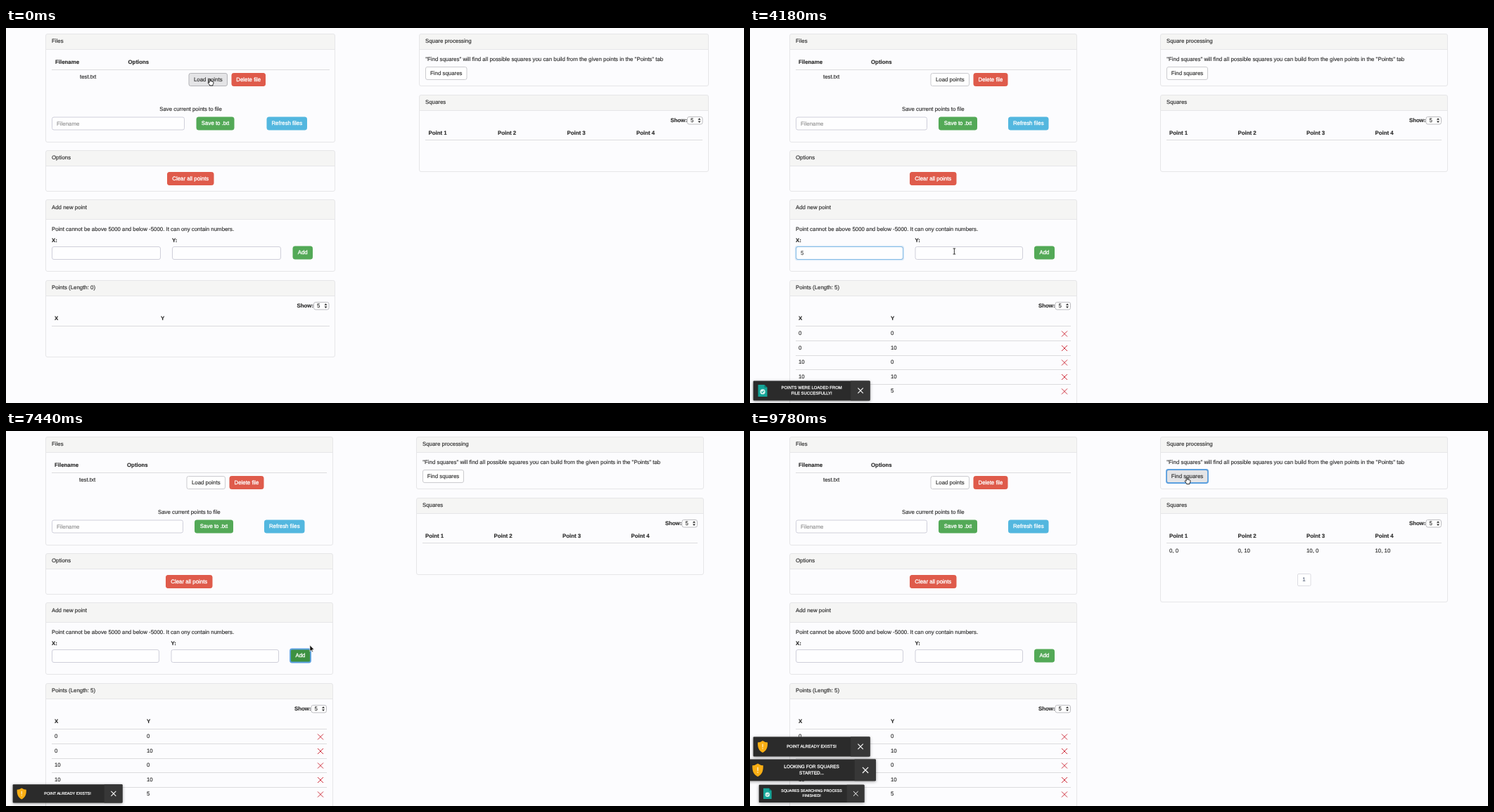
An HTML page with a canvas that plays this animation: 1049x534 px, repeating every 9880 ms.

```html
<!DOCTYPE html>
<html lang="en">
<head>
<meta charset="utf-8">
<title>Square finder</title>
<style>
html, body { margin: 0; width: 100%; height: 100%; overflow: hidden; background: #fcfcfe; }
canvas { display: block; width: 1049px; height: 534px; }
</style>
</head>
<body>
<canvas id="stage"></canvas>
<script>
const W = 1049, H = 534, LOOP = 9880, LAST = 9780;
const canvas = document.getElementById('stage');
const ctx = canvas.getContext('2d');
const dpr = window.devicePixelRatio || 1;
canvas.width = W * dpr;
canvas.height = H * dpr;

const FONT = '"Liberation Sans", Arial, sans-serif';
const INK = '#2a2a2a', LINE = '#dcdcde', EDGE = '#e6e6e8', PAGE = '#fcfcfe';
const RED = '#df5b4b', GREEN = '#53a957', BLUE = '#53b7df', RING = '#5a9fe0';

// moments of the user's actions and the page's replies
const T = {
  loadClick: 720, loaded: 930, xFocus: 3000, xTyped: 3560,
  yFocus: 4640, yTyped: 5200, firstOut: 6235, addClick: 6780,
  exists: 7080, findClick: 9420, started: 9580, finished: 9616
};

const pointer = [
  { from: 0, to: 0, x: 291, y: 77 },
  { from: 1750, to: 2650, x: 195.5, y: 316.5 },
  { from: 3800, to: 4560, x: 384.5, y: 319.5 },
  { from: 5750, to: 6400, x: 422, y: 325 },
  { from: 7300, to: 8250, x: 622, y: 70.5 }
];

const points = [[0, 0], [0, 10], [10, 0], [10, 10], [5, 5]];
const IN_KEYS = [[0, 0], [.2, 1.1], [.4, .9], [.6, 1.03], [.8, .97], [1, 1]];
const OUT_KEYS = [[0, 1], [.25, .95], [.5, 1.1], [1, 0]];

let wide = true;
const pick = (a, b) => wide ? a : b;

function keyed(keys, p) {
  if (p <= 0) return keys[0][1];
  for (let i = 1; i < keys.length; i++) {
    const [p0, v0] = keys[i - 1], [p1, v1] = keys[i];
    if (p <= p1) return v0 + (v1 - v0) * (p - p0) / (p1 - p0);
  }
  return keys[keys.length - 1][1];
}

function text(str, x, y, o = {}) {
  const size = o.size || 7.86;
  const base = y + size * .31;
  ctx.font = (o.bold ? 'bold ' : '') + size + 'px ' + FONT;
  ctx.textRendering = 'geometricPrecision';
  ctx.textAlign = o.align || 'left';
  ctx.fillStyle = ctx.strokeStyle = o.color || INK;
  ctx.fillText(str, x, base);
  ctx.lineWidth = o.heavy || .14;
  ctx.strokeText(str, x, base);
}

function box(x0, y0, x1, y1, fill, stroke, r = 2.5, weight = 1) {
  ctx.beginPath();
  ctx.roundRect(x0, y0, x1 - x0, y1 - y0, r);
  if (fill) { ctx.fillStyle = fill; ctx.fill(); }
  if (stroke) { ctx.strokeStyle = stroke; ctx.lineWidth = weight; ctx.stroke(); }
}

function rule(x0, x1, y, color = LINE) {
  ctx.fillStyle = color;
  ctx.fillRect(x0, y, x1 - x0, 1);
}

function cross(x, y, r, color, weight) {
  ctx.beginPath();
  ctx.moveTo(x - r, y - r); ctx.lineTo(x + r, y + r);
  ctx.moveTo(x + r, y - r); ctx.lineTo(x - r, y + r);
  ctx.strokeStyle = color;
  ctx.lineWidth = weight;
  ctx.stroke();
}

function panel(x0, x1, y0, head, y1, title) {
  box(x0 + .5, y0 + .5, x1 - .5, y1 - .5, PAGE, null);
  box(x0 + .5, y0 + .5, x1 - .5, head, '#f5f5f4', null, [2.5, 2.5, 0, 0]);
  rule(x0, x1, head, EDGE);
  box(x0 + .5, y0 + .5, x1 - .5, y1 - .5, null, EDGE);
  text(title, x0 + 9, (y0 + head) / 2 + (head - y0 > 25 ? -2.3 : 0));
}

function button(label, x0, x1, y, fill, focus) {
  const plain = fill === '#fff' || fill === '#e4e4e6';
  const edge = fill === '#fff' ? '#cbcbcf' : plain ? '#b4b4b8' : fill;
  box(x0 + .5, y + .5, x1 - .5, y + 18.5, fill, edge);
  if (focus) box(x0, y, x1, y + 19, null, RING, 2.5, 1.8);
  text(label, (x0 + x1) / 2, y + 9.5,
    { align: 'center', color: plain ? INK : '#fff', heavy: plain ? 0 : .3 });
}

// focus runs from 0 to 1
function input(x0, x1, y, value, focus, hint) {
  box(x0 + .5, y + .5, x1 - .5, y + 18.5, '#fefeff', '#cfcfda');
  if (focus > 0) {
    ctx.globalAlpha = focus;
    box(x0 - .5, y - .5, x1 + .5, y + 19.5, null, 'rgba(102,175,233,.22)', 3, 1.6);
    box(x0 + .5, y + .5, x1 - .5, y + 18.5, null, '#84bbe6');
    ctx.globalAlpha = 1;
  }
  text(value || hint || '', x0 + 7, y + 9.7, { color: value ? '#444' : '#909090' });
}

function select(x0, x1, y) {
  text('Show:', x0, y + 5.5, { bold: true, align: 'right' });
  box(x0 + .5, y + .5, x1 - .5, y + 11, '#fff', '#bdbdc1');
  text('5', x0 + 5, y + 5.7);
  const x = x1 - 5;
  ctx.fillStyle = INK;
  ctx.beginPath();
  ctx.moveTo(x - 2, y + 4.8); ctx.lineTo(x, y + 2.3); ctx.lineTo(x + 2, y + 4.8);
  ctx.moveTo(x - 2, y + 6.6); ctx.lineTo(x, y + 9.1); ctx.lineTo(x + 2, y + 6.6);
  ctx.fill();
}

function caret(x, y, since, t) {
  if ((t - since) % 1060 < 530) {
    ctx.fillStyle = INK;
    ctx.fillRect(x, y - 4, .8, 8);
  }
}

function leftColumn(t) {
  const right = pick(468, 465), end = pick(460, 456);
  const loaded = t >= T.loaded;
  const loadFocus = t >= T.loadClick && t < T.xFocus;
  const loadHot = t < T.xFocus;

  panel(56, right, 8, 30, 163, 'Files');
  text('Filename', pick(70, 69), 48.7, { bold: true });
  text('Options', pick(173.5, 172), 48.7, { bold: true });
  rule(65, end, 59);
  text('test.txt', pick(105, 104), 69.8);
  button('Load points', pick(259.5, 256.5), pick(315, 312), 64, loadHot ? '#e4e4e6' : '#fff', loadFocus);
  button('Delete file', pick(320.5, 317.5), pick(369, 366.5), 64, RED);
  text('Save current points to file', pick(262.5, 260.3), 115.7, { align: 'center' });
  input(65, pick(254, 252), 126.5, '', 0, 'Filename');
  button('Save to .txt', pick(270.5, 268), pick(324.5, 323), 126.5, GREEN);
  button('Refresh files', pick(370.5, 367), pick(428, 424.5), 126.5, BLUE);

  panel(56, right, 174, 196, 233, 'Options');
  button('Clear all points', pick(229, 227), pick(295.5, 293.5), 205, RED);

  // a field's glow fades in and out
  const glow = (from, to) => Math.max(0, Math.min(1, (t - from) / 150, 1 - (t - to) / 150));
  const xFocus = t >= T.xFocus && t < T.yFocus;
  const yFocus = t >= T.yFocus && t < T.addClick;
  const xVal = t >= T.xTyped && t < T.exists ? '5' : '';
  const yVal = t >= T.yTyped && t < T.exists ? '5' : '';
  const yLeft = pick(236, 234.5);
  panel(56, right, 244, 272, 347, 'Add new point');
  text('Point cannot be above 5000 and below -5000. It can ony contain numbers.', 65, 286.7);
  text('X:', 65, 303, { bold: true });
  text('Y:', yLeft, 303, { bold: true });
  input(65, pick(220, 218), 311, xVal, glow(T.xFocus, T.yFocus));
  input(yLeft, pick(391, 388), 311, yVal, glow(T.yFocus, T.addClick));
  if (xFocus) caret(72 + (xVal ? 4.6 : 0), 320.7, xVal ? T.xTyped : T.xFocus, t);
  if (yFocus) caret(yLeft + 7 + (yVal ? 4.6 : 0), 320.7, yVal ? T.yTyped : T.yFocus, t);

  const addFocus = t >= T.addClick && t < T.findClick;
  let addFill = GREEN;
  if (addFocus) addFill = t < T.addClick + 150 ? '#2f7432' : '#3d9141';
  else if (t > 6350 && t < T.addClick) addFill = '#449a48';
  button('Add', pick(407.5, 404), pick(436, 433), 310.5, addFill, addFocus);

  panel(56, right, 359, 381, loaded ? 620 : 469, 'Points (Length: ' + (loaded ? 5 : 0) + ')');
  select(pick(437, 433.5), pick(459.5, 456), 390);
  text('X', 69, 413.7, { bold: true });
  text('Y', pick(220, 200), 413.7, { bold: true });
  rule(65, end, 424);
  if (!loaded) return;
  points.forEach(([px, py], i) => {
    const y = 434.9 + i * 20.5;
    if (i) rule(65, end, Math.round(y - 10.4));
    text(px, 69, y);
    text(py, 200, y);
    cross(447, y + .6, 4, '#cf3340', 1);
  });
}

function rightColumn(t) {
  const x0 = pick(587, 583), x1 = pick(999, 992), end = pick(990, 983);
  const found = t >= T.finished;
  const cols = wide ? [600.5, 699, 797.5, 896] : [596, 693.5, 791, 888.5];
  panel(x0, x1, 8, 30, 83, 'Square processing');
  text('"Find squares" will find all possible squares you can build from the given points in the "Points" tab',
    x0 + 9.2, 44.7);
  button('Find squares', x0 + 9, pick(655.5, 651), 55, t > 8190 ? '#e4e4e6' : '#fff', t >= T.findClick);

  panel(x0, x1, 95, 117, found ? 244 : 205, 'Squares');
  select(pick(968, 960.5), pick(990.5, 983), 126);
  cols.forEach((x, i) => text('Point ' + (i + 1), x, 149.6, { bold: true }));
  rule(x0 + 9, end, 159);
  if (!found) return;
  cols.forEach((x, i) => text(points[i].join(', '), x, 170.6));
  box(778.5, 203.5, 797, 220.5, '#fff', '#dcdce2', 1.5);
  text('1', 787.5, 212, { align: 'center', color: '#56617a' });
}

function fileIcon() {
  ctx.fillStyle = '#16a598';
  ctx.beginPath();
  ctx.moveTo(-6.5, -8.5); ctx.lineTo(2.5, -8.5); ctx.lineTo(6.5, -4.5);
  ctx.lineTo(6.5, 8.5); ctx.lineTo(-6.5, 8.5);
  ctx.fill();
  ctx.fillStyle = '#0c7a72';
  ctx.beginPath();
  ctx.moveTo(2.5, -8.5); ctx.lineTo(6.5, -4.5); ctx.lineTo(2.5, -4.5);
  ctx.fill();
  ctx.fillStyle = '#d8f3ef';
  ctx.beginPath();
  ctx.arc(0, 1.5, 3.6, 0, 7);
  ctx.fill();
  ctx.strokeStyle = '#16a598';
  ctx.lineWidth = 1.1;
  ctx.beginPath();
  ctx.moveTo(-1.7, 1.5); ctx.lineTo(-.4, 2.8); ctx.lineTo(1.9, .3);
  ctx.stroke();
}

function shieldIcon() {
  ctx.fillStyle = '#f9ae14';
  ctx.beginPath();
  ctx.moveTo(0, -8.5);
  ctx.quadraticCurveTo(3.5, -6, 7, -6);
  ctx.bezierCurveTo(7.3, 2, 5, 6, 0, 8.5);
  ctx.bezierCurveTo(-5, 6, -7.3, 2, -7, -6);
  ctx.quadraticCurveTo(-3.5, -6, 0, -8.5);
  ctx.fill();
  ctx.fillStyle = '#fff3d0';
  ctx.fillRect(-.6, -3.8, 1.2, 4.8);
  ctx.fillRect(-.6, 2.2, 1.2, 1.3);
}

function toast(lines, icon, cy, scale) {
  if (scale <= 0) return;
  ctx.save();
  ctx.translate(87.6, cy);
  ctx.scale(scale, scale);
  ctx.shadowColor = 'rgba(0,0,0,.4)';
  ctx.shadowBlur = 4 * dpr;
  ctx.shadowOffsetY = dpr;
  box(-83, -14, 83, 14, '#2b2b2b', null, 1);
  ctx.shadowColor = 'transparent';
  box(55.5, -14, 83, 14, '#373737', null, [0, 1, 1, 0]);
  cross(69.5, 0, 3.7, '#fff', 1.1);
  lines.forEach((s, i) => text(s, 0, (i - (lines.length - 1) / 2) * 8.2 - .3,
    { size: 5.9, align: 'center', color: '#fff', heavy: .25 }));
  ctx.translate(-69.6, 0);
  icon();
  ctx.restore();
}

function toasts(t) {
  const grow = from => keyed(IN_KEYS, (t - from) / 1000);
  const base = 516.4, gap = 33.5;
  if (t >= T.loaded && t < T.firstOut + 620) {
    const s = t < T.firstOut ? grow(T.loaded) : keyed(OUT_KEYS, (t - T.firstOut) / 615);
    toast(['POINTS WERE LOADED FROM', 'FILE SUCCESFULLY!'], fileIcon, base, s);
  }
  const later = (t >= T.started) + (t >= T.finished);
  if (t >= T.exists) toast(['POINT ALREADY EXISTS!'], shieldIcon, base - gap * later, grow(T.exists));
  if (t >= T.started) {
    toast(['LOOKING FOR SQUARES', 'STARTED...'], shieldIcon, base - gap * (later - 1), grow(T.started));
  }
  if (t >= T.finished) {
    toast(['SQUARES SEARCHING PROCESS', 'FINISHED!'], fileIcon, base, grow(T.finished));
  }
}

function hand() {
  ctx.beginPath();
  ctx.moveTo(-1.9, .8);
  ctx.lineTo(-1.9, -4);
  ctx.quadraticCurveTo(-1.1, -5.6, -.3, -4);
  ctx.lineTo(-.3, -1.2);
  ctx.quadraticCurveTo(.7, -2, 1.3, -.9);
  ctx.quadraticCurveTo(2.3, -1.5, 2.8, -.4);
  ctx.quadraticCurveTo(4, -.7, 4, .6);
  ctx.quadraticCurveTo(4, 2.6, 3, 3.6);
  ctx.lineTo(2.9, 5);
  ctx.lineTo(-1.4, 5);
  ctx.lineTo(-1.7, 3.9);
  ctx.lineTo(-4, 1);
  ctx.quadraticCurveTo(-3.5, -.5, -1.9, .8);
  ctx.closePath();
  ctx.fillStyle = '#fff';
  ctx.fill();
  ctx.strokeStyle = '#111';
  ctx.lineWidth = .9;
  ctx.stroke();
}

function beam() {
  ctx.strokeStyle = '#222';
  ctx.lineWidth = .9;
  ctx.beginPath();
  ctx.moveTo(-1.8, -4); ctx.lineTo(1.8, -4);
  ctx.moveTo(0, -4); ctx.lineTo(0, 4);
  ctx.moveTo(-1.8, 4); ctx.lineTo(1.8, 4);
  ctx.stroke();
}

function arrow() {
  ctx.beginPath();
  ctx.moveTo(-2, -5); ctx.lineTo(-2, 4); ctx.lineTo(0, 2.2);
  ctx.lineTo(1.4, 5); ctx.lineTo(2.6, 4.4); ctx.lineTo(1.4, 1.7); ctx.lineTo(4, 1.5);
  ctx.closePath();
  ctx.fillStyle = '#111';
  ctx.fill();
  ctx.strokeStyle = '#fff';
  ctx.lineWidth = .7;
  ctx.stroke();
}

function drawPointer(t) {
  let { x, y } = pointer[0];
  for (const m of pointer) {
    if (t < m.from) break;
    const p = m.to > m.from ? Math.min(1, (t - m.from) / (m.to - m.from)) : 1;
    const e = p * p * (3 - 2 * p);
    x += (m.x - x) * e;
    y += (m.y - y) * e;
  }
  const over = (x0, x1, y0, y1) => x > x0 && x < x1 && y > y0 && y < y1;
  ctx.save();
  ctx.translate(x, y);
  if (over(256, 367, 64, 88) || over(404, 434, 310, 333) || over(592, 652, 57, 79) ||
      over(227, 294, 205, 228)) hand();
  else if (over(65, 218, 310, 331) || over(234, 388, 310, 331)) beam();
  else arrow();
  ctx.restore();
}

function draw(t) {
  wide = t < T.loaded;
  ctx.setTransform(dpr, 0, 0, dpr, 0, 0);
  ctx.fillStyle = PAGE;
  ctx.fillRect(0, 0, W, H);
  leftColumn(t);
  rightColumn(t);
  toasts(t);
  drawPointer(t);
}

const start = performance.now();
function tick() {
  draw(Math.min((performance.now() - start) % LOOP, LAST));
  requestAnimationFrame(tick);
}
tick();
</script>
</body>
</html>
```
